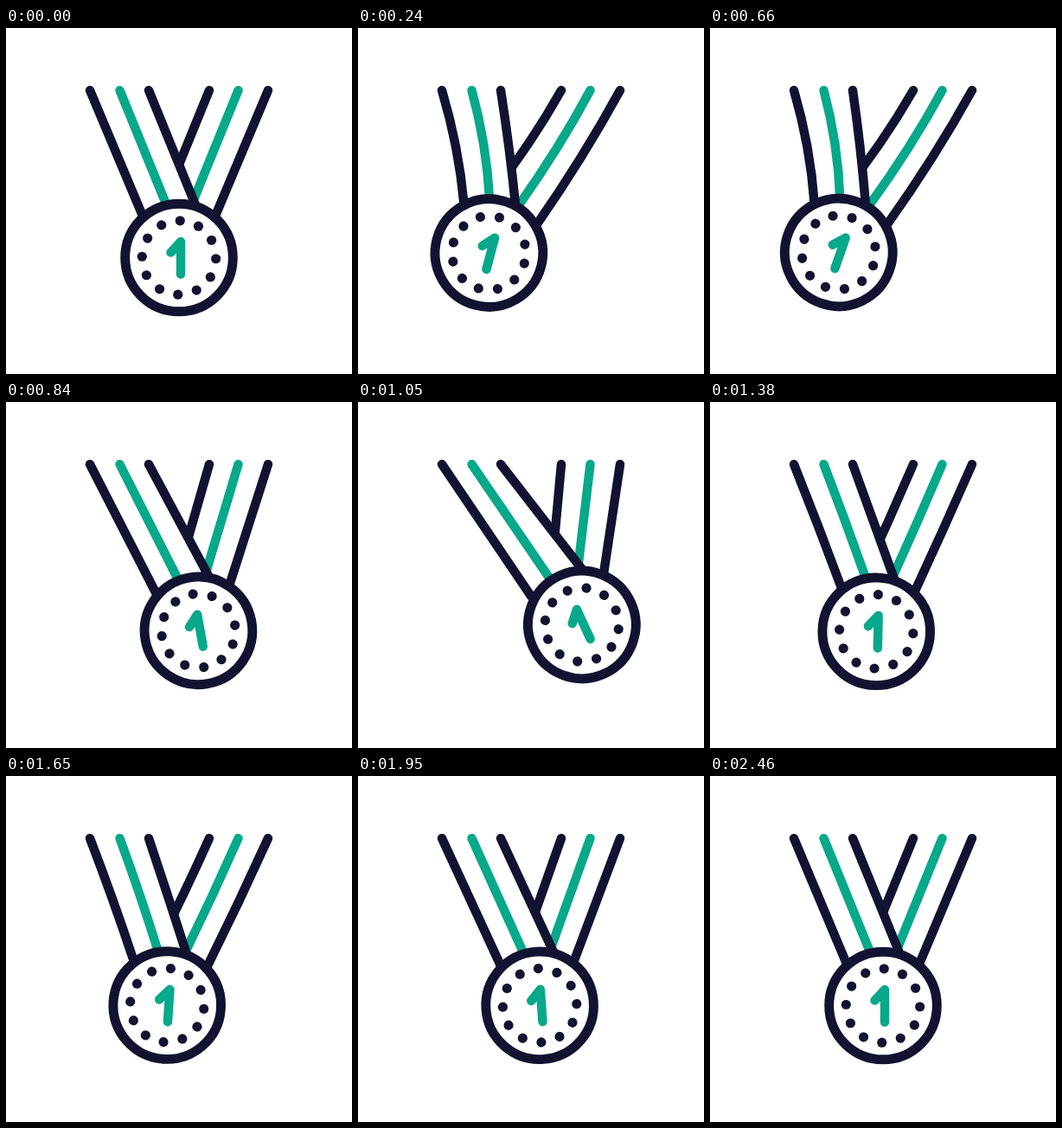
An HTML page with a canvas for the animation above (3.09 s loop, 400x400 px).

```html
<!DOCTYPE html>
<html lang="en">
<head>
<meta charset="utf-8">
<title>Swinging medal</title>
<style>
  html, body { margin: 0; width: 100%; height: 100%; overflow: hidden; background: #fff; }
  canvas { display: block; }
</style>
</head>
<body>
<canvas id="stage" width="400" height="400"></canvas>
<script>
const ctx = document.getElementById('stage').getContext('2d');
const NAVY = '#121331', GREEN = '#08a88a';
const LOOP = 3090, RAD = Math.PI / 180;

// time (ms), horizontal swing (px), medal rotation (deg)
const KEYS = [
  [0, 0, 0], [330, -59.2, 18], [600, -59.2, 22.5], [990, 62, -26],
  [1507, -20, 6], [2010, 11.3, -4.5], [2460, 0, 0], [LOOP, 0, 0]
];

// lines from outside to inside: top x, angle on the medal, lean, bow, colour
const FRONT = [
  [97, -41, 1, 0.14, NAVY], [131.5, -13.6, 1, 0.14, GREEN], [165, 17.2, 0.8, 0.04, NAVY]
];
const BACK = [
  [303, 41, 1.05, 0.12, NAVY], [268.5, 13.6, 1.05, 0.12, GREEN], [235, -17.2, 1, 0.14, NAVY]
];

function pose(t) {
  const i = KEYS.findIndex(k => k[0] > t);
  const a = KEYS[i - 1], b = KEYS[i];
  const u = (t - a[0]) / (b[0] - a[0]);
  const e = u * u * (3 - 2 * u);
  return { swing: a[1] + (b[1] - a[1]) * e, turn: a[2] + (b[2] - a[2]) * e };
}

function stroke(color, width = 10.5) {
  ctx.strokeStyle = color;
  ctx.lineWidth = width;
  ctx.stroke();
}

function circle(x, y, r) {
  ctx.beginPath();
  ctx.arc(x, y, r, 0, 2 * Math.PI);
}

function ribbon(lines, swing, cx, cy) {
  const slack = (lines === BACK) === (swing > 0);
  const tilt = -swing * (slack ? 0.29 : 0.36);
  const curves = lines.map(([x0, angle, lean, bow, color]) => {
    const a = (angle + tilt * lean) * RAD;
    const y0 = 72;
    const x1 = cx + 64 * Math.sin(a), y1 = cy - 64 * Math.cos(a);
    const mx = (x0 + x1) / 2 + bow * Math.max(0, -swing);
    return { x0, y0, x1, y1, mx, my: (y0 + y1) / 2, color };
  });

  const [outer, , inner] = curves;
  ctx.beginPath();
  ctx.moveTo(outer.x0, outer.y0);
  ctx.quadraticCurveTo(outer.mx, outer.my, outer.x1, outer.y1);
  ctx.lineTo(inner.x1, inner.y1);
  ctx.quadraticCurveTo(inner.mx, inner.my, inner.x0, inner.y0);
  ctx.fillStyle = '#fff';
  ctx.fill();

  for (const c of curves) {
    ctx.beginPath();
    ctx.moveTo(c.x0, c.y0);
    ctx.quadraticCurveTo(c.mx, c.my, c.x1, c.y1);
    stroke(c.color);
  }
}

function medal(cx, cy, turn) {
  ctx.save();
  ctx.translate(cx, cy);
  ctx.rotate(turn * RAD);
  circle(0, 0, 62.3);
  ctx.fillStyle = '#fff';
  ctx.fill();
  stroke(NAVY, 10.9);
  ctx.fillStyle = NAVY;
  for (let i = 0; i < 12; i++) {
    const a = (i * 30 + 1.7) * RAD;
    circle(42.7 * Math.sin(a), -42.7 * Math.cos(a), 5.6);
    ctx.fill();
  }
  ctx.beginPath();
  ctx.moveTo(-9.5, -6);
  ctx.lineTo(2, -18.5);
  ctx.lineTo(2, 19);
  stroke(GREEN);
  ctx.restore();
}

function draw(now) {
  const { swing, turn } = pose(now % LOOP);
  const cx = 200 + swing, cy = 265.5 - swing * swing / 432;
  ctx.fillStyle = '#fff';
  ctx.fillRect(0, 0, 400, 400);
  ctx.lineCap = ctx.lineJoin = 'round';
  ribbon(BACK, swing, cx, cy);
  ribbon(FRONT, swing, cx, cy);
  medal(cx, cy, turn);
}

const start = performance.now();
function tick() {
  draw(performance.now() - start);
  requestAnimationFrame(tick);
}
tick();
</script>
</body>
</html>
```
